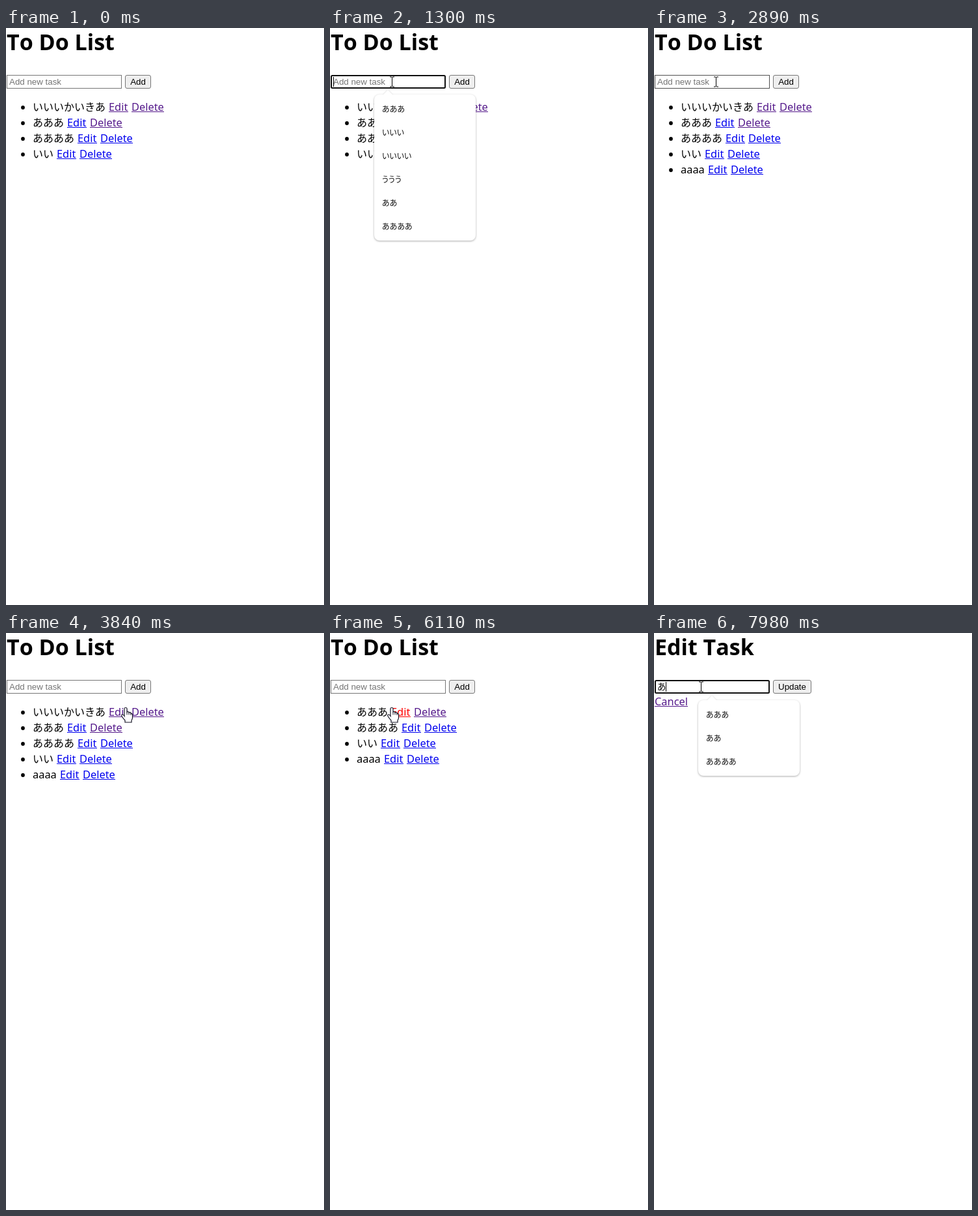
These frames come from a looping animation (489x885 px, 8000 ms). An HTML page:

```html
<!DOCTYPE html>
<html lang="ja">
<head>
<meta charset="utf-8">
<title>To Do List</title>
<style>
html, body { margin: 0; width: 100%; height: 100%; overflow: hidden; background: #fff; }
svg { display: block; }
text { font: 16.4px "Noto Sans", sans-serif; font-kerning: none; white-space: pre; }
.title { font-size: 34px; font-weight: 700; }
.ja { font: 16px "Noto Sans CJK JP", sans-serif; }
.form { font: 13.333px "Liberation Sans", "Noto Sans CJK JP", sans-serif; }
.hint { font: 12px "Noto Sans CJK JP", sans-serif; font-feature-settings: "palt"; fill: #111; }
.popup { filter: drop-shadow(0 1px 1.5px rgba(0, 0, 0, .32)); }
</style>
</head>
<body>
<svg id="stage" width="489" height="885" viewBox="0 0 489 885"></svg>
<script>
const LOOP = 8000, BLUE = '#0000ee', PURPLE = '#551a8b', RED = '#ff0000';
const stage = document.getElementById('stage');

// label, width, Edit colour, Delete colour
const TASKS = [
  ['いいいかいきあ', 112, PURPLE, PURPLE],
  ['あああ', 48, BLUE, PURPLE],
  ['ああああ', 64, BLUE, BLUE],
  ['いい', 32, BLUE, BLUE],
  ['aaaa', 37, BLUE, BLUE]
];

// pointer moves: start, end, steps, x, y
const MOVES = [
  [170, 300, 3, 206, 192],
  [560, 970, 7, 95, 82],
  [3350, 3480, 3, 134, 73],
  [3550, 3840, 5, 184, 114],
  [3910, 4100, 3, 216, 119],
  [5360, 5630, 4, 165, 137],
  [5690, 5910, 4, 95, 114],
  [6510, 6720, 4, 72, 82]
];

// field: time, value, focused
const FIELD = [
  [0, '', 0], [1170, '', 1], [1500, 'a', 1], [1630, 'aa', 1], [1830, 'aaa', 1],
  [2030, 'aaaa', 1], [2890, '', 0], [6180, 'あああ', 0], [6920, 'あああ', 1],
  [7850, 'ああ', 1], [7980, 'あ', 1]
];

// suggestions: time, opacity, top, items
const SIX = 'あああ いいい いいいい ううう ああ ああああ';
const POPUPS = [
  [0, 0], [1230, .6, 102, SIX], [1300, 1, 102, SIX], [1500, .5, 102, SIX], [1570, 0],
  [6990, 1, 103, 'あああ ああああ'], [7850, 1, 103, 'あああ ああ ああああ']
];

const POINTERS = {
  arrow: '<path d="M0 0V16.5L3.8 13 6.3 18.8 8.8 17.7 6.3 12.2H11.6Z" fill="#fff" stroke="#000"/>',
  beam: '<path d="M-3.5-7.5H-1L0-6.5 1-7.5H3.5M0-6.5V6.5M-3.5 7.5H-1L0 6.5 1 7.5H3.5" transform="translate(.5 .5)" fill="none" stroke="#000"/>',
  hand: '<path d="M-2 2Q-2 .5 0 .5Q2 .5 2 2V7Q4.5 6 5 8Q8 7 8 9.5Q10.5 9 10.5 12V16Q10.5 18 9 20V23H-1V20Q-4 17 -6 13.5Q-7 11 -5 11Q-3.5 11 -2 13.5Z" fill="#fff" stroke="#151525" stroke-width="1.2"/>' +
    '<path d="M2 7V11.5M5 8V11.5M8 9.5V12" stroke="#151525"/>'
};

const latest = (table, t) => table.filter(row => row[0] <= t).pop();
const text = (x, y, s, cls = '', fill = '#000', more = '') =>
  `<text x="${x}" y="${y}" class="${cls}" fill="${fill}" ${more}>${s}</text>`;
const rect = (x, y, w, h, more) => `<rect x="${x}" y="${y}" width="${w}" height="${h}" ${more}/>`;
const link = (x, y, s, w, fill) => text(x, y, s, '', fill) + rect(x, y + 1, w, 1, `fill="${fill}"`);

const onEditPage = t => t >= 6180;
const tasksAt = t => t < 2890 ? TASKS.slice(0, 4) : t < 4830 ? TASKS : TASKS.slice(1);

function pointerAt(t) {
  if (t < MOVES[0][0]) return null;
  let x = 561, y = 1209, moved = 0;
  for (const [from, to, steps, nx, ny] of MOVES) {
    if (t < from) break;
    const k = Math.min(1, (Math.floor((t - from) / (to - from) * (steps - 1)) + 1) / steps);
    x += (nx - x) * k;
    y += (ny - y) * k;
    moved = Math.min(t, to);
  }
  return { x, y, kind: kindAt(x, y, moved) };
}

const overField = p => p && p.x > 1 && p.x < 178 && p.y > 71 && p.y < 93;

function kindAt(x, y, t) {
  if (overField({ x, y })) return 'beam';
  const task = !onEditPage(t) && tasksAt(t)[Math.floor((y - 109) / 24)];
  if (!task) return 'arrow';
  const edit = 46 + task[1], del = edit + 35;
  if ((x >= edit && x < edit + 30) || (x >= del && x < del + 50)) return 'hand';
  return x > 41 && x < edit ? 'beam' : 'arrow';
}

function drawList(t) {
  return tasksAt(t).map(([label, w, edit, del], i) => {
    const y = 127 + 24 * i, x = 46 + w;
    if (i === 0 && t >= 4630 && t < 4700) del = RED;
    if (i === 0 && t >= 6110) edit = RED;
    return `<circle cx="26" cy="${y - 5}" r="2.9"/>` +
      text(41, y, label, label === 'aaaa' ? '' : 'ja') +
      link(x, y, 'Edit', 30, edit) + link(x + 35, y, 'Delete', 50, del);
  }).join('');
}

function drawField(t, hovered) {
  const [since, value, focused] = latest(FIELD, t);
  let out = focused
    ? rect(2, 73, 175, 19, 'rx="1.5" fill="#fff" stroke="#101010" stroke-width="2"')
    : rect(1.5, 72.5, 176, 20, `fill="#fff" stroke="${hovered ? '#4f4f4f' : '#767676'}"`);
  out += value ? text(5, 87, value, 'form') : text(5, 87, 'Add new task', 'form', '#757575');
  if (focused && (t - since) % 1060 < 530) {
    const w = value.length * (value[0] === 'a' ? 7.415 : 13.333);
    out += rect(Math.max(5, Math.floor(4.99 + w)), 75, 1, 15, 'fill="#000"');
  }
  return out;
}

function drawButton(label, w) {
  return rect(183.5, 72.5, w - 1, 20, 'rx="2.5" fill="#efefef" stroke="#767676"') +
    text(183 + w / 2, 87, label, 'form', '#000', 'text-anchor="middle"');
}

function drawPopup(t) {
  const [, alpha, top, words] = latest(POPUPS, t);
  if (!alpha) return '';
  const items = words.split(' ');
  const h = items.length * 36 + 8;
  return `<g opacity="${alpha}"><g class="popup">` +
    rect(68, top, 156, h, 'rx="8" fill="#fff"') +
    `<path d="M81 ${top + 1}L89 ${top - 7}L97 ${top + 1}Z" fill="#fff"/></g>` +
    items.map((s, i) => text(80, top + 26.5 + 36 * i, s, 'hint')).join('') + '</g>';
}

function draw(t) {
  const p = pointerAt(t), editing = onEditPage(t);
  let out = text(1, 34, editing ? 'Edit Task' : 'To Do List', 'title') +
    drawField(t, overField(p)) +
    (editing ? drawButton('Update', 59) + link(1, 111, 'Cancel', 51, PURPLE)
             : drawButton('Add', 40) + drawList(t)) +
    drawPopup(t);
  if (p) out += `<g transform="translate(${Math.round(p.x)} ${Math.round(p.y)})">${POINTERS[p.kind]}</g>`;
  return out;
}

let shown = '';
const start = performance.now();
function tick() {
  const next = draw((performance.now() - start) % LOOP);
  if (next !== shown) stage.innerHTML = shown = next;
  requestAnimationFrame(tick);
}
tick();
</script>
</body>
</html>
```
